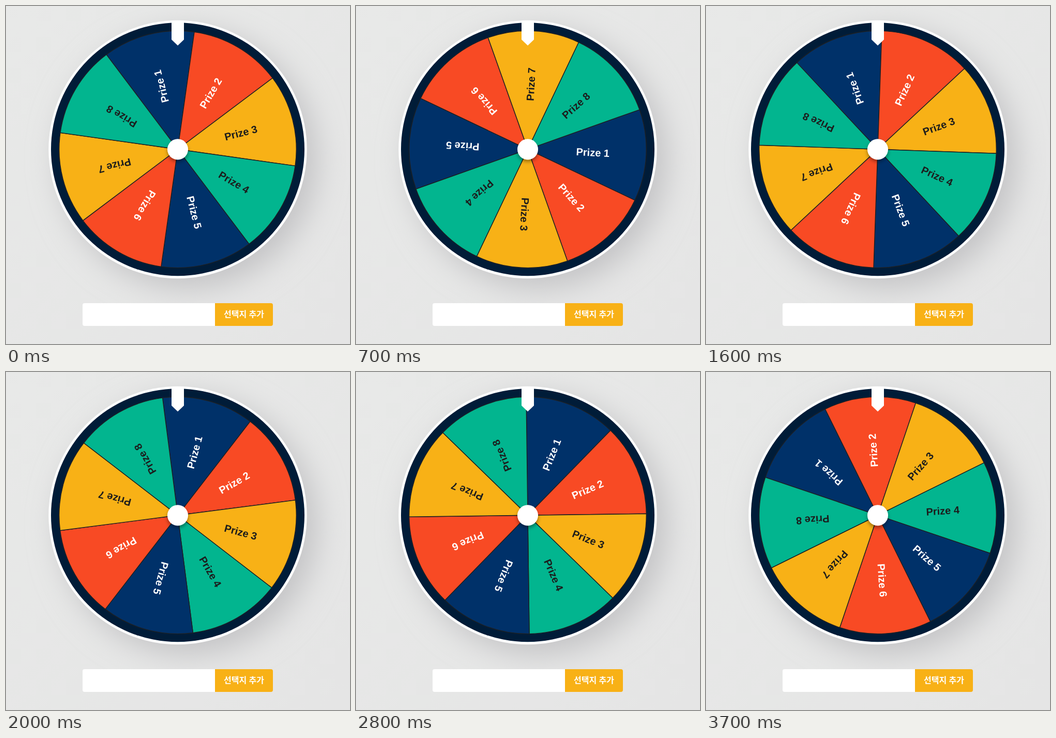
Recreate the animation shown at these times as an HTML page. Size 665x654 px, loop 3800 ms.

```html
<!DOCTYPE html>
<html lang="ko">
<head>
<meta charset="utf-8">
<title>Prize wheel</title>
<style>
  html, body { margin: 0; width: 100%; height: 100%; overflow: hidden; background: #e7e8e7; }
  svg { display: block; width: 665px; height: 654px; }
  .label { font: bold 20px "Liberation Sans", Arial, sans-serif; text-anchor: middle; }
  .button { font: bold 16px "Noto Sans CJK KR", "Noto Sans CJK", sans-serif; text-anchor: middle; fill: #fff; }
</style>
</head>
<body>
<svg viewBox="0 0 665 654">
  <defs>
    <linearGradient id="backdrop" x1="0" y1="0" x2="1" y2="1">
      <stop offset="0" stop-color="#e8e9e8"/>
      <stop offset="1" stop-color="#e5e5e5"/>
    </linearGradient>
    <filter id="soft" x="-50%" y="-50%" width="200%" height="200%">
      <feGaussianBlur stdDeviation="29"/>
    </filter>
    <filter id="hubShade" x="-50%" y="-50%" width="200%" height="200%">
      <feDropShadow dx="0" dy="4" stdDeviation="3.5" flood-color="#000" flood-opacity=".4"/>
    </filter>
  </defs>
  <rect width="665" height="654" fill="url(#backdrop)"/>
  <circle cx="352" cy="297" r="249" fill="#c3c3c5" filter="url(#soft)"/>
  <circle cx="332" cy="277.5" r="249.7" fill="#fff"/>
  <circle cx="332" cy="277.3" r="245" fill="#001c38"/>
  <g transform="translate(332 277.3)"><g id="wheel"></g></g>
  <circle cx="332" cy="277.3" r="20" fill="#fff" filter="url(#hubShade)"/>
  <path d="M320 28H344V65L332 76.5L320 65Z" fill="#fff"/>
  <path d="M404 575H152a4 4 0 0 0-4 4v36a4 4 0 0 0 4 4H404Z" fill="#fff"/>
  <path d="M404 575H512a4 4 0 0 1 4 4v36a4 4 0 0 1-4 4H404Z" fill="#f8b116"/>
  <text class="button" x="460" y="602">선택지 추가</text>
</svg>
<script>
const LOOP = 3800, STEP = 100, REST = -0.75, TURN = 1080;
const RADIUS = 229.3, COUNT = 8;
const SLICES = [
  ["#003169", "#fff"], ["#f84a24", "#fff"],
  ["#f8b116", "#1c1c1c"], ["#02b58f", "#1c1c1c"]
];
// Time in ms and spin progress; whole numbers are standstills.
const PACE = [
  [0, .202], [700, .4375], [1100, .5694], [1600, .7512],
  [2000, .8963], [2300, 1], [3159, 1], [3700, 1.188]
];
const wheel = document.getElementById("wheel");

function add(tag, attrs, text = "") {
  const node = document.createElementNS("http://www.w3.org/2000/svg", tag);
  for (const key in attrs) node.setAttribute(key, attrs[key]);
  node.textContent = text;
  wheel.appendChild(node);
}

function buildWheel() {
  const half = Math.PI / COUNT;
  const x = RADIUS * Math.cos(half), y = RADIUS * Math.sin(half);
  const slice = `M0 0L${x} ${-y}A${RADIUS} ${RADIUS} 0 0 1 ${x} ${y}Z`;
  for (let i = 0; i < COUNT; i++) {
    const [fill, ink] = SLICES[i % SLICES.length];
    const transform = `rotate(${(i + .5) * 360 / COUNT - 90})`;
    add("path", { d: slice, fill, transform, stroke: "#1d2023", "stroke-width": 1.4 });
    add("text", { class: "label", x: 126, y: 6.7, fill: ink, transform }, `Prize ${i + 1}`);
  }
}

// cubic-bezier(.25, .1, .25, 1)
function ease(x) {
  const curve = (u, a, b) => 3 * (1 - u) * (1 - u) * u * a + 3 * (1 - u) * u * u * b + u * u * u;
  let low = 0, high = 1;
  for (let i = 0; i < 30; i++) {
    const mid = (low + high) / 2;
    if (curve(mid, .25, .25) < x) low = mid; else high = mid;
  }
  return curve(low, .1, 1);
}

function progress(t) {
  const next = PACE.findIndex(([time]) => time > t);
  if (next < 0) return PACE[PACE.length - 1][1];
  const [t0, p0] = PACE[next - 1], [t1, p1] = PACE[next];
  return p0 + (p1 - p0) * (t - t0) / (t1 - t0);
}

function draw(t) {
  const angle = REST + TURN * ease(progress(t) % 1);
  wheel.setAttribute("transform", `rotate(${angle.toFixed(3)})`);
}

buildWheel();
draw(0);
let start;
function tick(now) {
  start ??= now;
  draw(Math.floor((now - start) % LOOP / STEP) * STEP);
  requestAnimationFrame(tick);
}
requestAnimationFrame(tick);
</script>
</body>
</html>
```
